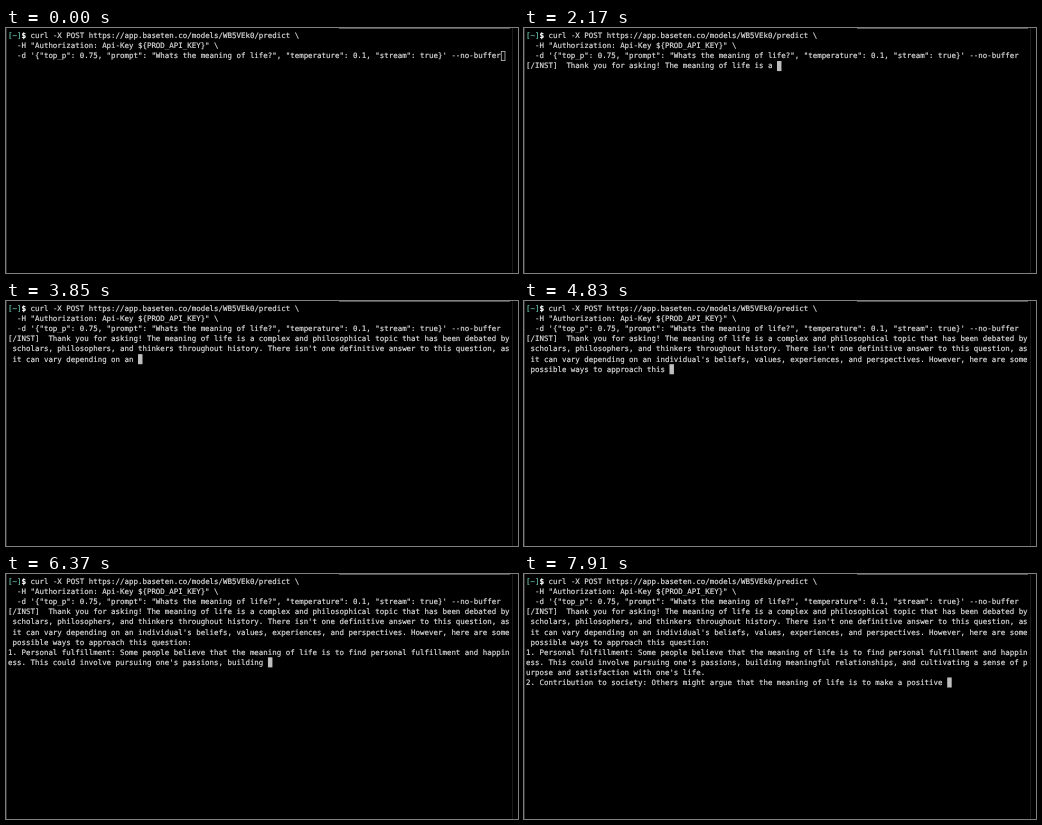
Recreate the animation shown at these times as an HTML page. Size 512 by 245 pixels, loop 7.98 s.

```html
<!DOCTYPE html>
<html lang="en">
<head>
<meta charset="utf-8">
<title>Terminal stream</title>
<style>
  html, body { margin: 0; width: 100%; height: 100%; overflow: hidden; background: #000; }
  svg { display: block; width: 512px; height: 245px; background: #000; }
  text {
    font: 7.44px "DejaVu Sans Mono", monospace;
    font-variant-ligatures: none;
    text-rendering: geometricPrecision;
    white-space: pre;
    fill: #dcdcdc;
    stroke: #dcdcdc;
    stroke-width: 0.18px;
  }
  .dir { fill: #66c8b2; stroke: #66c8b2; }
  .sign { fill: #fff; stroke: #fff; stroke-width: 0.4px; }
</style>
</head>
<body>
<svg id="stage" viewBox="0 0 512 245"></svg>
<script>
const LOOP = 7980, STEP = 70;
const COLS = 112, CELL = 4.48, LINE = 10.06, LEFT = 2.1, TOP = 2.85, BASE = 7.4;
const CURSOR = '#bebebe';

const command = [
  '[~]$ curl -X POST https://app.baseten.co/models/WB5VEk0/predict \\',
  '  -H "Authorization: Api-Key ${PROD_API_KEY}" \\',
  '  -d \'{"top_p": 0.75, "prompt": "Whats the meaning of life?", "temperature": 0.1, "stream": true}\' --no-buffer'
].join('\n');

// Each burst: start time, then chunks that arrive one step apart.
const bursts = [
  [1260, '\n'],
  [1750, '[/INST]  |Thank you |for asking! |The |meaning of |life is |a |complex |and philosophical |topic |that has |been '],
  [2590, 'debated by '],
  [2800, 'scholars, |philosophers, |and |thinkers |throughout |history. There '],
  [3290, "isn't |one definitive |answer |to this |question, |as it |can vary |depending |on an "],
  [3990, "individual's "],
  [4130, 'beliefs, |values, |experiences, and '],
  [4480, 'perspectives. |However, |here are |some possible |ways to |approach this '],
  [4970, 'question:\n|1. Personal '],
  [5250, 'fulfillment: |Some people |believe that |the meaning |of life |is to find |personal '],
  [5810, 'fulfillment |and |happiness. |This could |involve '],
  [6230, "pursuing |one's passions, |building |meaningful |relationships, |and |cultivating |a sense of |purpose |and satisfaction "],
  [7000, "with one's |life.\n"],
  [7210, '2. |Contribution |to society: '],
  [7490, 'Others might |argue that |the |meaning of |life is |to make |a positive ']
];

const states = [
  { at: 0, text: command, hollow: true },
  { at: 350, text: command }
];
for (const [start, chunks] of bursts) {
  chunks.split('|').forEach((chunk, i) => {
    states.push({ at: start + i * STEP, text: states[states.length - 1].text + chunk });
  });
}

const stage = document.getElementById('stage');

function setAttrs(node, attrs) {
  for (const key in attrs) node.setAttribute(key, attrs[key]);
  return node;
}

function add(tag, attrs, parent = stage) {
  const node = document.createElementNS('http://www.w3.org/2000/svg', tag);
  return parent.appendChild(setAttrs(node, attrs));
}

// Window edges
add('rect', { x: 0, y: 0, width: 1, height: 245, fill: '#303030' });
add('rect', { x: 506, y: 0, width: 1, height: 245, fill: '#1a1a1a' });
add('rect', { x: 333, y: 0, width: 171, height: 1, fill: '#555' });

const rows = Array.from({ length: 11 }, (_, r) =>
  add('text', { x: LEFT, y: TOP + r * LINE + BASE }));
const cursor = add('rect', {});

function wrap(text) {
  return text.split('\n').flatMap(line => {
    const parts = [];
    do {
      parts.push(line.slice(0, COLS));
      line = line.slice(COLS);
    } while (line);
    return parts;
  });
}

function setRow(row, line) {
  row.textContent = '';
  const [, dir, sign, rest] = line.match(/^(\[~\])?(\$)?(.*)$/);
  if (dir) add('tspan', { class: 'dir' }, row).textContent = dir;
  if (sign) add('tspan', { class: 'sign' }, row).textContent = sign;
  add('tspan', {}, row).textContent = rest;
}

function placeCursor(col, row, hollow) {
  const inset = hollow ? 0.4 : 0;
  setAttrs(cursor, {
    x: LEFT + col * CELL + inset,
    y: TOP + row * LINE + inset,
    width: CELL - 2 * inset,
    height: LINE - 2 * inset,
    fill: hollow ? 'none' : CURSOR,
    stroke: hollow ? CURSOR : 'none',
    'stroke-width': 0.8
  });
}

let shown;
function draw() {
  const t = performance.now() % LOOP;
  const state = states.findLast(s => s.at <= t);
  if (state !== shown) {
    shown = state;
    const lines = wrap(state.text);
    rows.forEach((row, r) => setRow(row, lines[r] || ''));
    placeCursor(lines[lines.length - 1].length, lines.length - 1, state.hollow);
  }
  requestAnimationFrame(draw);
}
draw();
</script>
</body>
</html>
```
